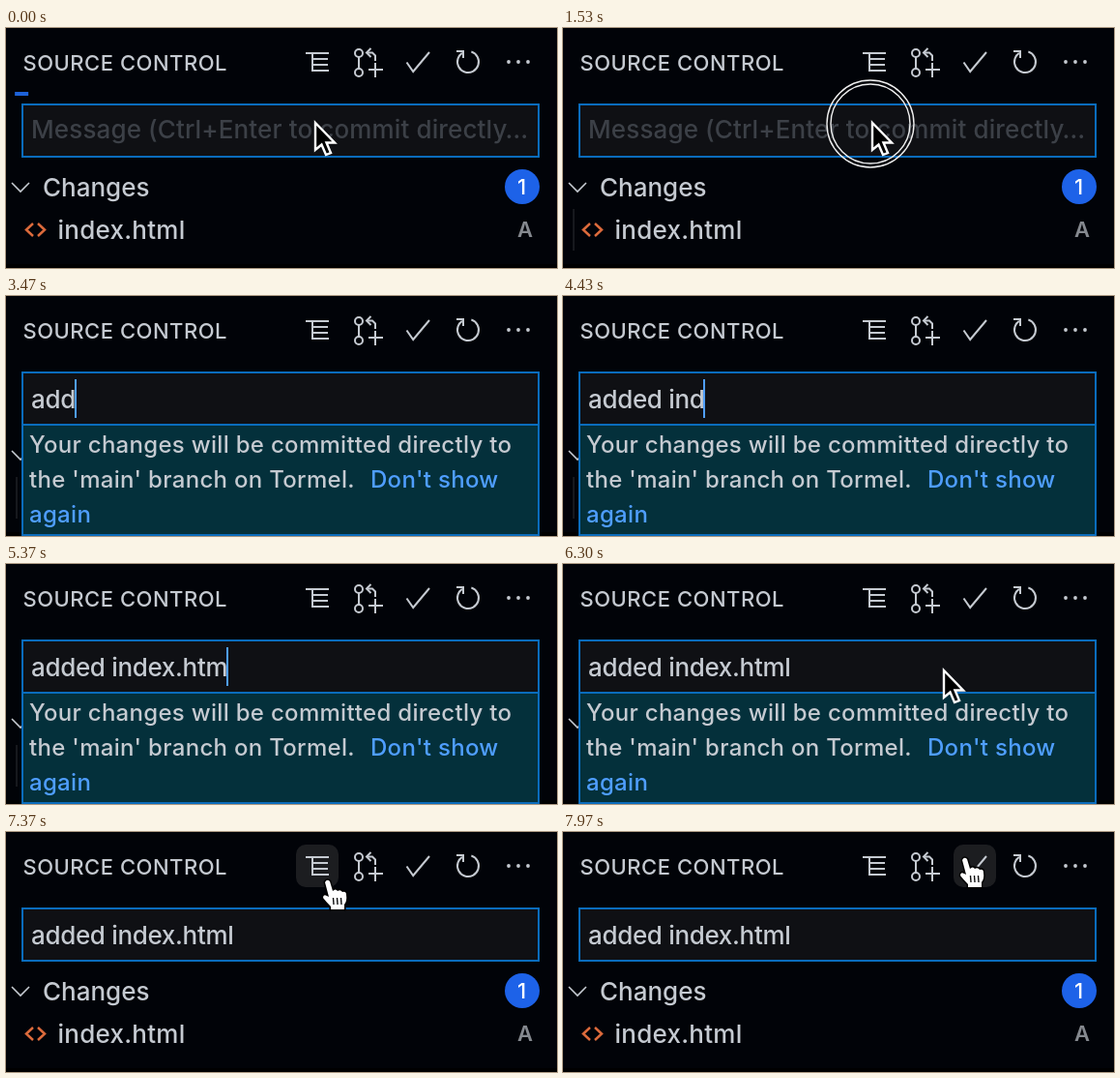
Write an HTML page with a canvas that moves like this. It is 570 px wide and 248 px high and loops after 8 s.

```html
<!DOCTYPE html>
<html lang="en">
<head>
<meta charset="utf-8">
<title>Source control panel</title>
<style>
html, body { margin: 0; width: 100%; height: 100%; overflow: hidden; background: #010308; }
canvas { display: block; }
</style>
</head>
<body>
<canvas id="stage" width="570" height="248"></canvas>
<script>
const ctx = document.getElementById('stage').getContext('2d');
const LOOP = 8000;
const FG = '#c5cad1', BLUE = '#0a6cbc', LINK = '#4f9eff', FIELD = '#0f1014';
const MESSAGE = 'added index.html';
const TYPE_START = 3060, KEY_GAP = 160;
const TYPE_END = TYPE_START + KEY_GAP * (MESSAGE.length - 1);
const POPUP_IN = 1720, POPUP_OUT = 6600, MOVE_START = 6070;

// pointer stops: time, x, y
const PATH = [
  [MOVE_START, 318, 97], [6300, 392, 109], [6480, 420, 66], [6640, 392, 12],
  [6900, 336, 40], [7370, 333, 50], [7480, 340, 44], [7740, 418, 28], [7970, 416, 27]
];
const BUTTONS = [300, 352, 404, 456, 508];

const clamp = v => Math.max(0, Math.min(1, v));
const span = (t, a, b) => clamp((t - a) / (b - a));
const smooth = p => p * p * (3 - 2 * p);

function text(str, x, y, size, color, spacing = 0, weight = 500) {
  ctx.font = `${weight} ${size}px Inter, "Open Sans", sans-serif`;
  ctx.letterSpacing = spacing + 'px';
  ctx.fillStyle = color;
  ctx.fillText(str, x, y);
  return ctx.measureText(str).width;
}

function line(points, color = FG, width = 2) {
  ctx.beginPath();
  for (let i = 0; i < points.length; i += 2) ctx.lineTo(points[i], points[i + 1]);
  ctx.strokeStyle = color;
  ctx.lineWidth = width;
  ctx.stroke();
}

function ring(x, y, r, color = FG, width = 2, from = 0, to = Math.PI * 2) {
  ctx.beginPath();
  ctx.arc(x, y, r, from, to);
  ctx.strokeStyle = color;
  ctx.lineWidth = width;
  ctx.stroke();
}

function disc(x, y, r, color) {
  ctx.beginPath();
  ctx.arc(x, y, r, 0, Math.PI * 2);
  ctx.fillStyle = color;
  ctx.fill();
}

function box(x, y, w, h, fill, border) {
  ctx.fillStyle = border;
  ctx.fillRect(x, y, w, h);
  ctx.fillStyle = fill;
  ctx.fillRect(x + 2, y + 2, w - 4, h - 4);
}

function drawIcons() {
  line([310, 26, 334, 26]);
  line([317, 26, 317, 44, 334, 44]);
  line([317, 32, 333, 32]);
  line([317, 38, 333, 38]);

  ring(365, 26, 4);
  ring(365, 46, 4);
  line([365, 30, 365, 42]);
  line([377.5, 21, 373, 25.5, 377.5, 30]);
  line([373, 25.5, 379, 25.5, 382, 28.5, 382, 34]);
  line([375, 43, 390, 43]);
  line([382, 36, 382, 51]);

  line([414.5, 35.5, 421.2, 45, 438, 25]);

  ring(478, 35, 11, FG, 2, -1.26, 4.12);
  line([466, 24, 473, 24, 473, 31]);

  for (const x of [520, 530, 540]) disc(x, 35, 1.9, FG);
}

function drawList(guide) {
  line([6, 160, 15, 169, 24, 160], FG, 1.6);
  text('Changes', 38, 174, 26, FG);
  disc(534, 164, 18, '#1d62e8');
  text('1', 529, 172, 22, '#fff');
  ctx.globalAlpha = guide;
  ctx.fillStyle = '#17191e';
  ctx.fillRect(10, 187, 2, 43);
  ctx.globalAlpha = 1;
  line([28, 202, 21, 208.5, 28, 215], '#dd6b3c', 2.5);
  line([33, 202, 40, 208.5, 33, 215], '#dd6b3c', 2.5);
  text('index.html', 53.5, 218, 26, FG, 0.25);
  text('A', 529, 216, 22, '#85898f', 0, 600);
}

function drawField(t) {
  box(16, 78, 536, 56, FIELD, BLUE);
  const typed = MESSAGE.slice(0, Math.max(0, Math.floor((t - TYPE_START) / KEY_GAP) + 1));
  let end = 26;
  if (typed) end += text(typed, 26, 116, 26, FG, -0.33);
  else text('Message (Ctrl+Enter to commit directly…', 26, 114, 26, '#3c4047', 0.13);

  if (t < POPUP_IN || t >= POPUP_OUT) return;
  const typing = t >= TYPE_START && t < TYPE_END;
  const since = t < TYPE_START ? t - POPUP_IN : t - TYPE_END;
  if (typing || since % 1000 < 500) {
    ctx.fillStyle = LINK;
    ctx.fillRect(Math.round(end - 1), 86, 2, 40);
  }
}

function drawPopup() {
  box(16, 132, 536, 116, '#04303b', BLUE);
  text('Your changes will be committed directly to', 24, 162, 24, FG, 0.3);
  text("the 'main' branch on Tormel.", 24, 198, 24, FG, 0.3);
  text("Don't show", 377, 198, 24, LINK, 0.3);
  text('again', 24, 234, 24, LINK, 0.3);
}

function drawProgress(t) {
  const alpha = 1 - span(t, 350, 500);
  if (!alpha) return;
  ctx.globalAlpha = alpha;
  ctx.fillStyle = '#1d62d8';
  ctx.fillRect(9 + t * 0.14, 66, 14 + t * 0.012, 4);
  ctx.globalAlpha = 1;
}

function drawClick(t) {
  if (t < 970 || t > 1750) return;
  const grow = start => 1 - (1 - span(t, start, 1500)) ** 2;
  ctx.globalAlpha = 1 - span(t, 1600, 1750);
  ring(318, 99, 45 * grow(970), '#eee', 1.4);
  ring(318, 99, 41 * grow(1030), '#eee', 1.4);
  ctx.globalAlpha = 1;
}

function pointerAt(t) {
  let i = 0;
  while (i < PATH.length - 2 && t > PATH[i + 1][0]) i++;
  const [a, x0, y0] = PATH[i], [b, x1, y1] = PATH[i + 1];
  const p = smooth(span(t, a, b));
  return [x0 + (x1 - x0) * p, y0 + (y1 - y0) * p];
}

function drawArrow(x, y) {
  const shape = new Path2D('M2 1V29L8.5 23.5L13 34L18 32L13.5 21.5H22Z');
  ctx.save();
  ctx.translate(x, y);
  ctx.fillStyle = '#000';
  ctx.fill(shape);
  ctx.strokeStyle = '#fff';
  ctx.lineWidth = 2.4;
  ctx.stroke(shape);
  ctx.restore();
}

function drawHand(x, y) {
  const shape = new Path2D('M-3 2Q-1 -2 2 1L5 11Q8 8 10 11Q13 9 15 12Q19 11 19 15Q20 21 17 25V30H3V27' +
    'Q-2 22 -5 18Q-5 14 -1 16L1 17Z');
  ctx.save();
  ctx.translate(x, y);
  ctx.strokeStyle = '#000';
  ctx.lineWidth = 3;
  ctx.stroke(shape);
  ctx.fillStyle = '#fff';
  ctx.fill(shape);
  for (const k of [5.5, 9.5, 13.5]) line([k, 18, k + 0.5, 25], '#111', 1.4);
  ctx.restore();
}

function draw(t) {
  const [x, y] = pointerAt(t);
  const hover = y > 13 && y < 57 ? BUTTONS.find(b => x >= b && x <= b + 44) : undefined;

  ctx.fillStyle = '#010308';
  ctx.fillRect(0, 0, 570, 248);
  ctx.fillStyle = '#000';
  ctx.fillRect(0, 244, 570, 4);
  text('SOURCE CONTROL', 17.5, 44, 22, FG, 0.5);
  if (hover !== undefined) {
    ctx.beginPath();
    ctx.roundRect(hover, 13, 44, 44, 10);
    ctx.fillStyle = '#1c1d20';
    ctx.fill();
  }
  drawIcons();
  drawProgress(t);
  drawList(span(t, 970, 1100) * (1 - span(t, 6100, 6250)));
  drawField(t);
  if (t >= POPUP_IN && t < POPUP_OUT) drawPopup();
  drawClick(t);
  if (t >= TYPE_START && t < MOVE_START) return;
  if (hover === undefined) drawArrow(x, y);
  else drawHand(x, y);
}

const start = performance.now();
function tick() {
  draw((performance.now() - start) % LOOP);
  requestAnimationFrame(tick);
}
tick();
</script>
</body>
</html>
```
